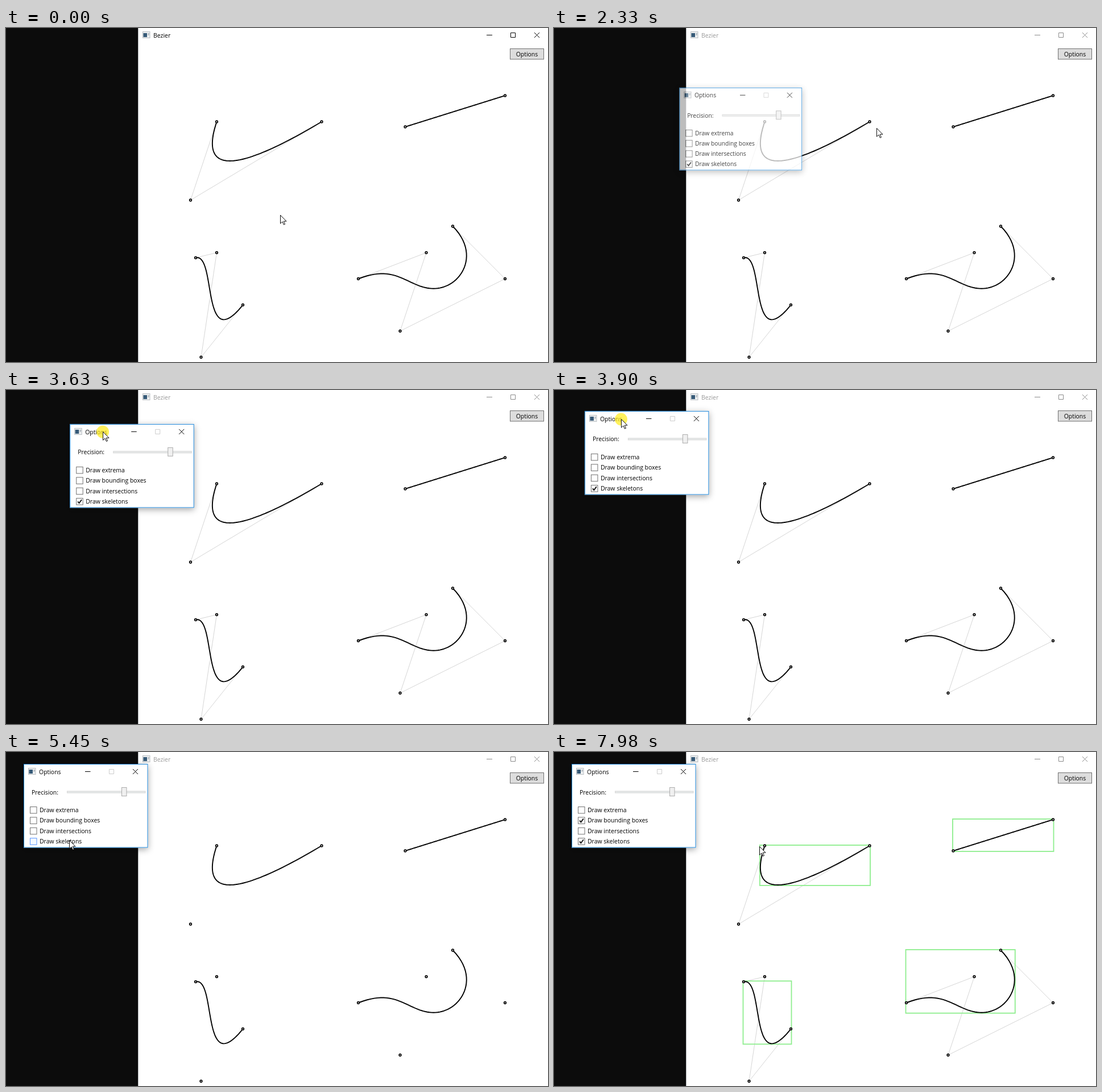
An HTML page that plays this animation: 953 px wide and 588 px high, repeating every 8000 ms.

```html
<!DOCTYPE html>
<html lang="en">
<head>
<meta charset="utf-8">
<title>Bezier</title>
<style>
  html, body { margin: 0; width: 100%; height: 100%; overflow: hidden; background: #0c0c0c; }
  svg { display: block; }
  text { font: 10.45px "Open Sans", "Noto Sans", sans-serif; fill: #000; }
  .glyph { fill: none; stroke: #000; stroke-width: 1; }
  .inactive text { fill: #999; }
  .inactive .glyph { stroke: #8a8a8a; }
  .curve { fill: none; stroke: #000; stroke-width: 1.9; }
  .skeleton { fill: none; stroke: #d3d3d3; stroke-width: .95; }
  .bounds { fill: none; stroke: #90ee90; stroke-width: 1.85; }
  .point { fill: #fff; stroke: #000; stroke-width: 1.7; }
  .box { fill: #fff; stroke: #707070; }
  .hover .box { fill: #f3f9ff; stroke: #5593ff; }
  .tick { fill: none; stroke: #181818; stroke-width: 1.9; }
  .button { fill: #ddd; stroke: #707070; }
  .button.hover { fill: #bee6fd; stroke: #3c7fb1; }
  .button.pressed { fill: #c4e5f6; stroke: #2c628b; }
</style>
</head>
<body>
<svg width="953" height="588" viewBox="0 0 953 588">
  <defs>
    <filter id="shadow" x="-20%" y="-20%" width="140%" height="145%">
      <feDropShadow dx="0" dy="3" stdDeviation="6" flood-color="#000" flood-opacity=".36"/>
    </filter>
    <g id="icon">
      <rect x=".5" y=".5" width="12.5" height="11" fill="#eef0f1" stroke="#b9bec2"/>
      <rect x="1.5" y="3" width="6.5" height="7" fill="#365a78"/>
      <path d="M9.5 4H12M9.5 6H11.5" stroke="#7d8a94"/>
    </g>
  </defs>
  <rect width="953" height="588" fill="#0c0c0c"/>
  <rect x="232" width="721" height="588" fill="#fff"/>
  <path d="M232.5 0V588" stroke="#a5abae" stroke-width=".8"/>
  <g id="caption">
    <use href="#icon" x="240" y="6"/>
    <text x="259" y="16.7">Bezier</text>
    <path class="glyph" d="M845 12.5H855M887.5 8.5H895.5V16.5H887.5ZM929 8L938 17M938 8L929 17"/>
  </g>
  <rect id="button" x="886.5" y="36.5" width="59" height="18.5"/>
  <text x="916" y="49.7" text-anchor="middle">Options</text>
  <g id="skeletons"></g>
  <g id="bounds"></g>
  <g id="curves"></g>
  <g id="options">
    <rect width="218.5" height="147.5" fill="#fff" filter="url(#shadow)"/>
    <rect x=".5" y=".5" width="217.5" height="146.5" fill="#fff" stroke="#1883d7"/>
    <use href="#icon" x="8" y="7"/>
    <text x="27" y="17.7">Options</text>
    <path class="glyph" d="M108 13.5H117.5M192 9L201 18M201 9L192 18"/>
    <path d="M150.5 9.5H158.5V17.5H150.5Z" fill="none" stroke="#ccc"/>
    <text x="14" y="53.5">Precision:</text>
    <rect x="76.5" y="48" width="137.5" height="3" fill="#e7eaea" stroke="#d6d6d6"/>
    <rect x="172.5" y="41.5" width="8.5" height="15" fill="#f0f0f0" stroke="#acacac"/>
    <g id="checks"></g>
  </g>
  <circle id="press" r="11" fill="#ffeb1e" fill-opacity=".72"/>
  <path id="cursor" d="M.5.5V15.2L4 12 6.4 17.3 8.5 16.4 6.2 11.2H11Z" fill="#fff" stroke="#000" stroke-width=".95"/>
</svg>
<script>
const $ = id => document.getElementById(id);
const DURATION = 8000;

const curves = [
  [[370.5, 165], [324.5, 303], [555, 165]],
  [[702, 174], [877.5, 119]],
  [[333.5, 404.5], [370.5, 395.5], [343, 579.5], [416.5, 487.5]],
  [[619.5, 441.5], [739, 395.5], [693, 533.5], [877.5, 441.5], [785.5, 349]]
];

// De Casteljau evaluation for any degree
function bezier(points, t) {
  while (points.length > 1)
    points = points.slice(1).map((p, i) => p.map((v, k) => points[i][k] * (1 - t) + v * t));
  return points[0];
}

for (const points of curves) {
  const samples = Array.from({ length: 61 }, (_, i) => bezier(points, i / 60));
  const [left, top] = [0, 1].map(k => Math.min(...samples.map(p => p[k])) - 1);
  const [right, bottom] = [0, 1].map(k => Math.max(...samples.map(p => p[k])) + 1);
  $('skeletons').innerHTML += `<polyline class="skeleton" points="${points}"/>`;
  $('bounds').innerHTML +=
    `<rect class="bounds" x="${left}" y="${top}" width="${right - left}" height="${bottom - top}"/>`;
  $('curves').innerHTML += `<polyline class="curve" points="${samples}"/>` +
    points.map(([x, y]) => `<circle class="point" cx="${x}" cy="${y}" r="1.8"/>`).join('');
}

const labels = ['Draw extrema', 'Draw bounding boxes', 'Draw intersections', 'Draw skeletons'];
$('checks').innerHTML = labels.map((label, i) => `<g transform="translate(11 ${75 + 18.4 * i})">
  <rect class="box" x=".5" y=".5" width="11.5" height="11.5"/>
  <path class="tick" d="M3 6.3L5.4 9 9.8 3"/>
  <text x="17" y="9.8">${label}</text></g>`).join('');
const rows = [...$('checks').children];
const ticks = rows.map(row => row.querySelector('.tick'));

// Keys: time, x, y
const cursorKeys = [
  [0, 482, 329], [729, 482, 329], [730, 483, 329], [1020, 483, 329], [1200, 525, 366],
  [1450, 740, 210], [1700, 895, 60], [1820, 908, 45], [2000, 908, 45], [2330, 568, 176],
  [2480, 405, 152], [2630, 325, 136], [3180, 285, 118], [3330, 285, 118], [3400, 277, 119],
  [3700, 146, 62], [3900, 118, 51], [4110, 102, 37], [4220, 96, 35], [4330, 96, 35],
  [4600, 120, 161], [4700, 119, 164], [4920, 109, 147], [4950, 110, 149], [5150, 110, 149],
  [5350, 111, 155], [6390, 111, 155], [6520, 121, 142], [6760, 111, 122], [7400, 111, 122],
  [7980, 361, 166]
];
const windowKeys = [
  [0, 219, 104], [3370, 219, 104], [3400, 218.8, 103.8], [3700, 85, 49],
  [3900, 54, 37], [4110, 37, 23], [4220, 31, 21]
];
const presses = [[1840, 1940], [3330, 4250], [5380, 5450], [6070, 6150], [7100, 7200]];

// Monotone cubic interpolation: smooth, but never overshoots a key
function follow(keys, t) {
  const last = keys.length - 1;
  if (t >= keys[last][0]) return keys[last].slice(1);
  const i = keys.findIndex(key => key[0] > t) - 1;
  const [t0, t1] = [keys[i][0], keys[i + 1][0]];
  const span = t1 - t0, u = (t - t0) / span;
  return [1, 2].map(k => {
    const slope = j => j < 0 || j >= last ? 0 :
      (keys[j + 1][k] - keys[j][k]) / (keys[j + 1][0] - keys[j][0]);
    const tangent = j => {
      const a = slope(j - 1), b = slope(j);
      return a * b > 0 ? 2 * a * b / (a + b) : 0;
    };
    const a = keys[i][k], b = keys[i + 1][k];
    return a + (b - a) * u * u * (3 - 2 * u) +
      span * u * (1 - u) * (tangent(i) * (1 - u) - tangent(i + 1) * u);
  });
}

const show = (node, on) => node.style.display = on ? '' : 'none';

function draw(t) {
  const [x, y] = follow(cursorKeys, t);
  const [wx, wy] = follow(windowKeys, t);
  const pressed = presses.some(([from, to]) => t >= from && t < to);
  const opened = Math.min(1, Math.max(0, (t - 2200) / 180));
  const scale = 1 - .1 * (1 - opened) ** 1.6;

  $('cursor').setAttribute('transform', `translate(${x} ${y})`);
  $('press').setAttribute('transform', `translate(${x} ${y + .5})`);
  show($('press'), pressed);

  $('caption').setAttribute('class', opened ? 'inactive' : '');
  const overButton = x > 886 && x < 946 && y > 36 && y < 55;
  $('button').setAttribute('class', 'button' + (overButton ? pressed ? ' pressed' : ' hover' : ''));

  show($('options'), opened);
  $('options').setAttribute('opacity', opened);
  $('options').setAttribute('transform',
    `translate(${wx + 109.25 * (1 - scale)} ${wy + 73.75 * (1 - scale)}) scale(${scale})`);

  const skeletons = t < 5450 || t >= 6150, bounds = t >= 7200;
  const checked = [false, bounds, false, skeletons];
  rows.forEach((row, i) => {
    const over = t > 4300 && x > 41 && x < 168 && Math.abs(y - 102.3 - 18.4 * i) < 8.7;
    row.setAttribute('class', over ? 'hover' : '');
    show(ticks[i], checked[i]);
  });
  show($('skeletons'), skeletons);
  show($('bounds'), bounds);
}

const start = performance.now();
function tick() {
  draw((performance.now() - start) % DURATION);
  requestAnimationFrame(tick);
}
tick();
</script>
</body>
</html>
```
